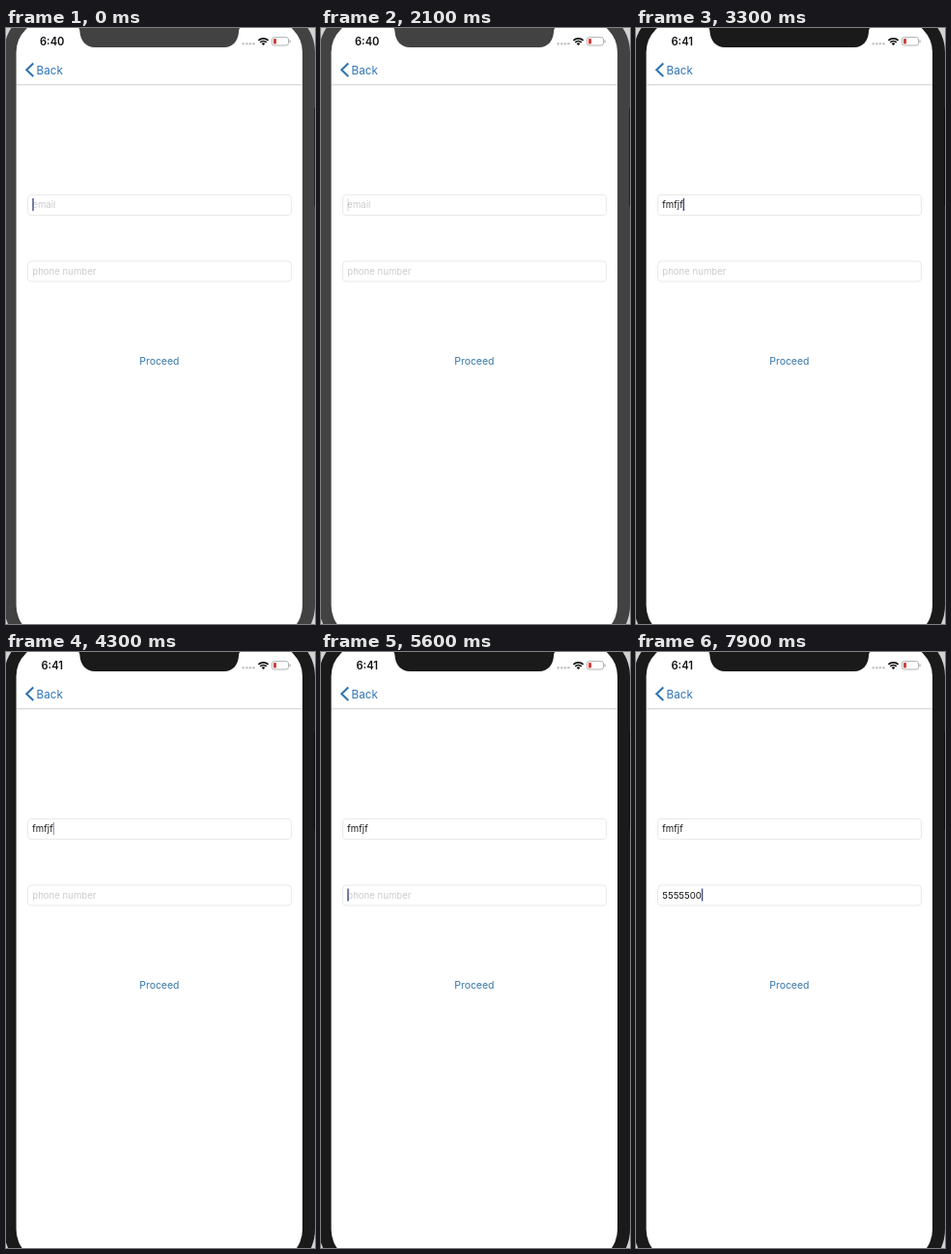
Recreate the animation shown at these times as an HTML page with a canvas. Size 320 by 616 pixels, loop 8 s.

```html
<!DOCTYPE html>
<html lang="en">
<head>
<meta charset="utf-8">
<title>Form validation</title>
<style>
html, body { margin: 0; width: 100%; height: 100%; overflow: hidden; background: #fff; }
canvas { display: block; width: 320px; height: 616px; }
</style>
</head>
<body>
<canvas id="stage"></canvas>
<script>
const W = 320, H = 616, LOOP = 8000;
const LIGHTS_OUT = 2500, NEXT_MINUTE = 3000, TAP = 4700, REFOCUS = 5600;
const BLINK = 1000, HOLD = 500;
const FONT = 'Inter, Roboto, "Liberation Sans", sans-serif';

const email = { y: 172, hint: 'email', value: 'fmfjf', focus: -HOLD, blur: REFOCUS, start: 2700, end: 3300, pace: 1.7 };
const phone = { y: 240.5, hint: 'phone number', value: '5555500', focus: REFOCUS, blur: LOOP, start: 6200, end: 7900, pace: 1 };

const canvas = document.getElementById('stage');
const ratio = window.devicePixelRatio || 1;
canvas.width = W * ratio;
canvas.height = H * ratio;
const ctx = canvas.getContext('2d');

// Progress of t from a to b, limited to 0..1.
const ramp = (t, a, b) => Math.min(1, Math.max(0, (t - a) / (b - a)));

function typed({ value, start, end, pace }, t) {
  if (t < start) return '';
  const p = ramp(t, start, end) ** pace;
  return value.slice(0, 1 + Math.floor((value.length - 1) * p));
}

// Solid while typing, then blinking once the field has been idle.
function caretAlpha({ focus, blur, start, end }, t) {
  if (t < focus || t >= blur) return 0;
  if (t >= start && t < end) return 1;
  const idle = t - (t < start ? focus : end) - HOLD;
  if (idle < 0) return 1;
  const phase = idle % BLINK;
  return 1 - ramp(phase, 0, 120) + ramp(phase, 400, 600);
}

function text(str, x, y, size, color, weight = 400, align = 'left') {
  ctx.font = `${weight} ${size}px ${FONT}`;
  ctx.textAlign = align;
  ctx.fillStyle = color;
  ctx.fillText(str, x, y);
  return ctx.measureText(str).width;
}

function box(x, y, w, h, r) {
  ctx.beginPath();
  ctx.roundRect(x, y, w, h, r);
}

function fillBox(color, ...shape) {
  ctx.fillStyle = color;
  box(...shape);
  ctx.fill();
}

function device(t) {
  const bezel = t < LIGHTS_OUT ? '#424242' : '#1a1a1a';
  ctx.fillStyle = '#d2d2d2';
  ctx.fillRect(0, 0, W, H);
  fillBox(bezel, -2, -20.5, 322, 663, 45.5);
  fillBox(t < LIGHTS_OUT ? '#242424' : '#0c0c0c', 319, 83, 1, 101, 0);
  fillBox('#fff', 10.6, -8, 296.4, 638, 33);

  // Notch
  ctx.fillStyle = bezel;
  ctx.beginPath();
  ctx.moveTo(74, -1);
  ctx.quadraticCurveTo(76.5, 0, 76.5, 4);
  ctx.bezierCurveTo(77, 13, 83, 20, 92, 20);
  ctx.lineTo(226, 20);
  ctx.bezierCurveTo(235, 20, 240.5, 13, 241, 4);
  ctx.quadraticCurveTo(241, 0, 243.5, -1);
  ctx.fill();
}

function wifi(x, y) {
  const from = -Math.PI * .75, to = -Math.PI * .25;
  ctx.strokeStyle = ctx.fillStyle = '#111';
  ctx.lineWidth = 1.7;
  for (const r of [7.2, 4.5]) {
    ctx.beginPath();
    ctx.arc(x, y, r, from, to);
    ctx.stroke();
  }
  ctx.beginPath();
  ctx.moveTo(x, y);
  ctx.arc(x, y, 2.6, from, to);
  ctx.fill();
}

function statusBar(t) {
  text(t < NEXT_MINUTE ? '6:40' : '6:41', 47.7, 17.9, 11.2, '#111', 600, 'center');
  for (let i = 0; i < 4; i++) fillBox('#c4c4c4', 244.4 + i * 3.6, 15, 2.5, 2.5, 1.25);
  wifi(266.5, 18);
  ctx.strokeStyle = '#aaa';
  ctx.lineWidth = .9;
  box(275.5, 9.6, 17, 8.4, 2.3);
  ctx.stroke();
  fillBox('#aaa', 293.4, 12.3, 1.2, 3, .6);
  fillBox('#d93a3a', 277, 11, 3, 5.6, 1);
}

function navBar() {
  ctx.strokeStyle = '#2f75b5';
  ctx.lineWidth = 2.1;
  ctx.beginPath();
  ctx.moveTo(28.3, 36.6);
  ctx.lineTo(21.3, 43.3);
  ctx.lineTo(28.3, 50);
  ctx.stroke();
  text('Back', 31.6, 47.6, 11.7, '#2f75b5');
  fillBox('#cfcfcf', 11, 58.3, 296, 1, 0);
}

function drawField(field, t) {
  const { y, hint } = field, x = 27.3;
  const value = typed(field, t);
  ctx.strokeStyle = '#e9e9e9';
  ctx.lineWidth = 1;
  box(22.5, y + .5, 273, 21, 3.5);
  ctx.stroke();
  const width = text(value || hint, x, y + 14.2, 9.6, value ? '#111' : '#cbcbcd');
  ctx.globalAlpha = caretAlpha(field, t);
  fillBox('#414a86', value ? x + width : x, y + 4, 1.4, 13, 0);
  ctx.globalAlpha = 1;
}

function drawError(field) {
  const name = field.hint.split(' ')[0];
  text(`The inserted ${name} is invalid`, 295, field.y + 31.3, 7.3, '#111', 700, 'right');
}

function draw(t) {
  ctx.setTransform(ratio, 0, 0, ratio, 0, 0);
  device(t);
  statusBar(t);
  navBar();
  for (const field of [email, phone]) {
    drawField(field, t);
    if (t >= TAP && t < REFOCUS) drawError(field);
  }
  ctx.globalAlpha = t < TAP ? 1 : .34 + .66 * ramp(t, TAP, TAP + 400);
  text('Proceed', 158.8, 348.4, 10.4, '#3677a8', 400, 'center');
  ctx.globalAlpha = 1;
}

const start = performance.now();
function tick() {
  draw((performance.now() - start) % LOOP);
  requestAnimationFrame(tick);
}
tick();
</script>
</body>
</html>
```
